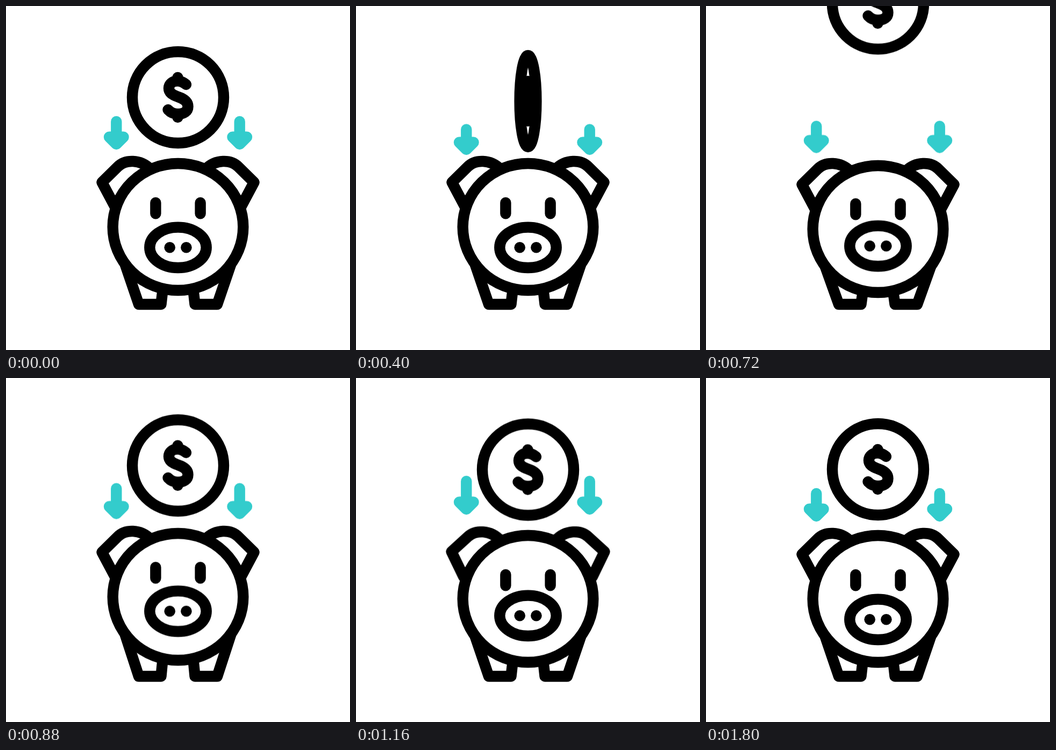
Write an HTML page without scripts that moves like this. It is 640 px wide and 640 px high and loops after 2000 ms.

```html
<!DOCTYPE html>
<html lang="en">
<head>
<meta charset="utf-8">
<title>Piggy bank</title>
<style>
html, body { margin: 0; width: 100%; height: 100%; overflow: hidden; background: #fff; }
svg { display: block; width: 100%; height: 100%; }
.line { fill: #fff; stroke: #000; stroke-width: 20.4; stroke-linecap: round; stroke-linejoin: round; }
.arrow { fill: #3cc; stroke: #3cc; stroke-width: 20.4; stroke-linecap: round; stroke-linejoin: round; }
.dot { fill: #000; stroke: none; }
.dollar { fill: none; }

.coin, .rim, .dollar, .body, .legs, .ear, .eyes, .snout, .shaft, .head {
  animation: 2s cubic-bezier(.4, 0, .6, 1) infinite;
}
.coin { animation-name: drop; }
.rim { animation-name: turn-rim; }
.dollar { animation-name: turn-dollar; }
.body { animation-name: bounce; }
.legs { animation-name: bend; }
.ear { animation-name: flap; transform-origin: 268px 303px; }
.eyes { animation-name: look; }
.snout { animation-name: sniff; }
.shaft { animation-name: slide-shaft; }
.head { animation-name: slide-head; }

/* Falls behind the pig, then a new coin comes in from above. */
@keyframes drop {
  0% { transform: translate(320px, 170px); }
  18.2% { transform: translate(320px, 170px); animation-timing-function: cubic-bezier(.33, 0, .67, .33); }
  29% { transform: translate(320px, 410px); animation-timing-function: step-end; }
  34% { transform: translate(320px, -115px); animation-timing-function: linear; }
  36% { transform: translate(320px, -7px); animation-timing-function: cubic-bezier(.3, .64, .66, .92); }
  44% { transform: translate(320px, 162.5px); animation-timing-function: ease-out; }
  48% { transform: translate(320px, 172px); }
  58% { transform: translate(320px, 170.5px); }
  64%, 100% { transform: translate(320px, 170px); }
}
@keyframes turn-rim {
  0%, 4% { rx: 85px; }
  22% { rx: 13.6px; }
  33.9% { rx: 13.6px; animation-timing-function: step-end; }
  34%, 100% { rx: 85px; }
}
@keyframes turn-dollar {
  0%, 4%, 34%, 100% {
    d: path("M15 -24C9 -29 4 -30.5 -1 -30.5C-10 -30.5 -17 -25 -17 -17C-17 -9 -11 -5 0 -1C12 3 18.5 8 18.5 17C18.5 26 11 31 0 31C-8 31 -14 28 -18.5 23M-.5 -37L-.5 -31M-.5 31L-.5 37");
  }
  22%, 33.9% {
    d: path("M2.4 -24C1.4 -29 .6 -30.5 -.2 -30.5C-1.6 -30.5 -2.7 -25 -2.7 -17C-2.7 -9 -1.8 -5 0 -1C1.9 3 3 8 3 17C3 26 1.8 31 0 31C-1.3 31 -2.2 28 -3 23M-.1 -37L-.1 -31M-.1 31L-.1 37");
  }
}
@keyframes bounce {
  0%, 24% { transform: translateY(0); }
  31% { transform: translateY(7px); }
  45% { transform: translateY(-4px); }
  60%, 100% { transform: translateY(0); }
}
/* Feet stay on the ground while the tops follow the body. */
@keyframes bend {
  0%, 24%, 60%, 100% { d: path("M218 470L247 555L288.5 555L291 533M422 470L393 555L351.5 555L349 533"); }
  31% { d: path("M218 477L247 555L288.5 555L291 540M422 477L393 555L351.5 555L349 540"); }
  45% { d: path("M218 466L247 555L288.5 555L291 529M422 466L393 555L351.5 555L349 529"); }
}
@keyframes flap {
  0%, 44% { transform: none; }
  56% { transform: translateY(-1.3px) rotate(2.2deg); }
  90%, 100% { transform: none; }
}
@keyframes look {
  0%, 25% { transform: translateY(0); }
  32% { transform: translateY(6px); }
  45% { transform: translateY(-14px); }
  59%, 100% { transform: translateY(0); }
}
@keyframes sniff {
  0%, 24% { transform: translateY(0); }
  30% { transform: translateY(3px); }
  46% { transform: translateY(-16px); animation-timing-function: cubic-bezier(.17, .5, .5, 1); }
  90%, 100% { transform: translateY(0); }
}
@keyframes slide-shaft {
  0%, 4% { transform: translateY(0); }
  26% { transform: translateY(17.5px); animation-timing-function: cubic-bezier(.45, 0, .55, 1); }
  56.5% { transform: translateY(-23px); }
  88%, 100% { transform: translateY(0); }
}
@keyframes slide-head {
  0%, 4% { transform: translateY(0); }
  26% { transform: translateY(11.8px); animation-timing-function: cubic-bezier(.45, 0, .55, 1); }
  56.5% { transform: translateY(-13px); }
  88%, 100% { transform: translateY(0); }
}
</style>
</head>
<body>
<svg viewBox="0 0 640 640">
  <g class="arrow">
    <path class="shaft" d="M205.3 215V245"/>
    <path class="head" d="M192 243.7H218.6L205.3 257Z"/>
    <g transform="matrix(-1 0 0 1 640 0)">
      <path class="shaft" d="M205.3 215V245"/>
      <path class="head" d="M192 243.7H218.6L205.3 257Z"/>
    </g>
  </g>

  <g class="line">
    <g class="coin">
      <ellipse class="rim" rx="85" ry="85"/>
      <path class="dollar" d="M15 -24C9 -29 4 -30.5 -1 -30.5C-10 -30.5 -17 -25 -17 -17C-17 -9 -11 -5 0 -1C12 3 18.5 8 18.5 17C18.5 26 11 31 0 31C-8 31 -14 28 -18.5 23M-.5 -37L-.5 -31M-.5 31L-.5 37"/>
    </g>

    <path class="legs" d="M218 470L247 555L288.5 555L291 533M422 470L393 555L351.5 555L349 533"/>

    <g class="body">
      <path class="ear" d="M203 374L178.5 328L208 299C222 285 250 285 268 303"/>
      <g transform="matrix(-1 0 0 1 640 0)">
        <path class="ear" d="M203 374L178.5 328L208 299C222 285 250 285 268 303"/>
      </g>
      <ellipse cx="320" cy="411" rx="121.3" ry="118"/>
    </g>

    <path class="eyes" d="M278.4 366V386.3M361.6 366V386.3"/>

    <g class="snout">
      <ellipse cx="320" cy="449.3" rx="52.7" ry="37.7"/>
      <circle class="dot" cx="304.7" cy="449.3" r="10.3"/>
      <circle class="dot" cx="335.4" cy="449.3" r="10.3"/>
    </g>
  </g>
</svg>
</body>
</html>
```
